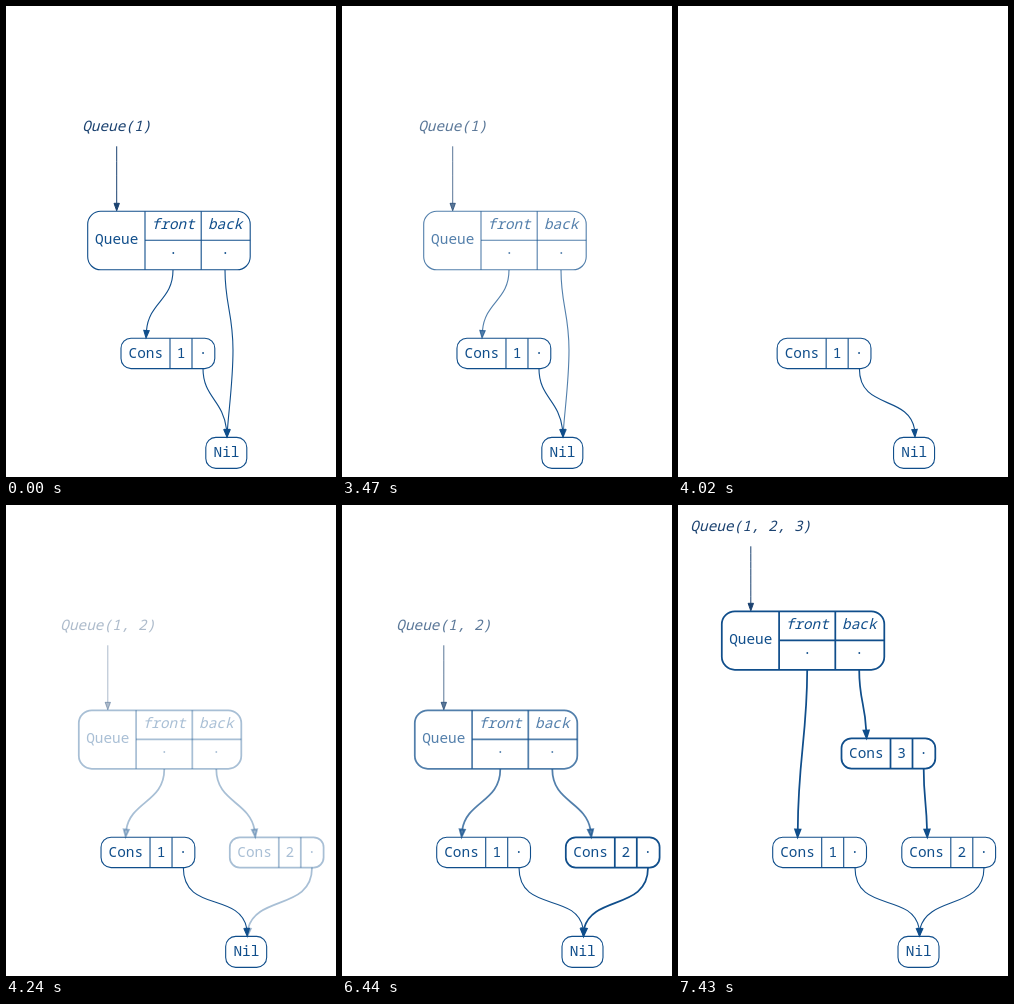
An HTML page with a canvas that plays this animation: 330 px wide and 471 px high, repeating every 8000 ms.

```html
<!DOCTYPE html>
<html lang="en">
<head>
<meta charset="utf-8">
<title>Persistent queue</title>
<style>
  html, body { margin: 0; height: 100%; overflow: hidden; background: #fff; }
  canvas { display: block; width: 330px; height: 471px; }
</style>
</head>
<body>
<canvas></canvas>
<script>
const W = 330, H = 471, LOOP = 8000, STEP = 110, FIRST = 500, DURATION = 1000;
const STARTS = [3400, 6370];
const BLUE = '#104e8b', DARK = '#1b4270';
const THIN = 1.1, THICK = 1.75;

const canvas = document.querySelector('canvas');
const ctx = canvas.getContext('2d');
const ratio = window.devicePixelRatio || 1;
canvas.width = W * ratio;
canvas.height = H * ratio;
ctx.scale(ratio, ratio);
ctx.textAlign = 'center';

function setColor(color) {
  ctx.strokeStyle = ctx.fillStyle = color;
}

function text(str, x, y, style = 'normal') {
  ctx.font = `${style} 14.4px "Noto Sans Mono", monospace`;
  ctx.fillText(str, x, y);
}

function box(x, y, w, h, r) {
  ctx.beginPath();
  ctx.roundRect(x, y, w, h, r);
  ctx.stroke();
}

function line(x1, y1, x2, y2) {
  ctx.beginPath();
  ctx.moveTo(x1, y1);
  ctx.lineTo(x2, y2);
  ctx.stroke();
}

function arrowHead(x, y, tipX, tipY) {
  const angle = Math.atan2(tipY - y, tipX - x);
  ctx.save();
  ctx.translate(tipX, tipY);
  ctx.rotate(angle);
  ctx.beginPath();
  ctx.moveTo(-0.5, 0);
  ctx.lineTo(-8, -2.7);
  ctx.lineTo(-8, 2.7);
  ctx.closePath();
  ctx.fill();
  ctx.stroke();
  ctx.restore();
}

// Points: start, then cubic segments, then the arrow tip.
function link(_, width, ...p) {
  ctx.lineWidth = width;
  ctx.beginPath();
  ctx.moveTo(p[0], p[1]);
  let i = 2;
  for (; i + 6 < p.length; i += 6) ctx.bezierCurveTo(...p.slice(i, i + 6));
  ctx.stroke();
  arrowHead(p[i - 2], p[i - 1], p[i], p[i + 1]);
}

function queue(label, width, x, y) {
  const mid = x + 29;
  setColor(DARK);
  text(label, mid, y - 80.5, 'italic');
  link(null, 1, mid, y - 65, mid, y - 45, mid, y - 25, mid, y - 8, mid, y);

  setColor(BLUE);
  ctx.lineWidth = width;
  box(x, y, 162.5, 58.5, 13);
  line(x + 57.3, y, x + 57.3, y + 58.5);
  line(x + 113.5, y, x + 113.5, y + 58.5);
  line(x + 57.3, y + 29, x + 162.5, y + 29);
  text('Queue', mid, y + 33);
  text('front', x + 85.5, y + 18, 'italic');
  text('back', x + 137.5, y + 18, 'italic');
  text('·', x + 85.5, y + 47);
  text('·', x + 137.5, y + 47);
}

function cons(value, width, x, y) {
  ctx.lineWidth = width;
  box(x, y, 93.8, 30.3, 10);
  line(x + 49, y, x + 49, y + 30.3);
  line(x + 71, y, x + 71, y + 30.3);
  text('Cons', x + 24.8, y + 19.7);
  text(value, x + 60, y + 19.7);
  text('·', x + 82, y + 19.7);
}

function nil(label, width, x, y) {
  ctx.lineWidth = width;
  box(x, y, 41, 31, 10);
  text(label, x + 20.7, y + 19.5);
}

const oneToNil = [link, '', THIN, 177, 362.5, 177, 408, 234, 387, 241, 423, 241.5, 431.5];
const twoToNil = width => [link, '', width, 306, 362.5, 306, 405, 251, 390, 242.2, 423, 241.5, 431.5];

// Items whose key occurs in two scenes move; the others fade.
const scenes = [
  {
    queue1: [queue, 'Queue(1)', THIN, 81.7, 205.3],
    front1: [link, '', THIN, 167, 264, 167, 294, 143, 296, 140.5, 324.5, 140, 332.5],
    back1: [link, '', THIN, 219, 264, 219, 299, 227, 307, 227, 344, 227, 374, 223, 402, 221.5, 423, 221, 431.5],
    cons1: [cons, '1', THIN, 115, 332.3],
    nil: [nil, 'Nil', THIN, 199.8, 431.4],
    oneToNil: [link, '', THIN, 197, 362.5, 197, 391, 217, 394, 220.5, 423, 221, 431.5]
  },
  {
    queue2: [queue, 'Queue(1, 2)', THICK, 72.8, 205.3],
    front2: [link, '', THICK, 158.3, 264, 158.3, 297, 125, 296, 120.3, 324.5, 119.6, 332.5],
    back2: [link, '', THICK, 210.3, 264, 210.3, 297, 243, 296, 248.5, 324.5, 249.3, 332.5],
    cons1: [cons, '1', THIN, 94.7, 332.3],
    cons2: [cons, '2', THICK, 223.8, 332.3],
    nil: [nil, 'Nil', THIN, 220, 431.4],
    oneToNil,
    twoToNil: twoToNil(THICK)
  },
  {
    queue3: [queue, 'Queue(1, 2, 3)', THICK, 43.8, 106.3],
    front3: [link, '', THICK, 129.2, 165, 129.2, 230, 120, 255, 119.8, 324.5, 119.6, 332.5],
    back3: [link, '', THICK, 181.2, 165, 181.2, 195, 187, 198, 188.2, 225.5, 188.6, 233.5],
    cons3: [cons, '3', THICK, 163.5, 233.3],
    threeToTwo: [link, '', THICK, 245.7, 264, 245.7, 293, 248.4, 296, 249, 324.5, 249.3, 332.5],
    cons1: [cons, '1', THIN, 94.7, 332.3],
    cons2: [cons, '2', THIN, 223.8, 332.3],
    nil: [nil, 'Nil', THIN, 220, 431.4],
    oneToNil,
    twoToNil: twoToNil(THIN)
  }
];

const clamp = v => Math.min(1, Math.max(0, v));
const ease = t => t < 0.5 ? 4 * t ** 3 : 1 - 4 * (1 - t) ** 3;

function drawItem([shape, label, ...nums], alpha) {
  if (alpha <= 0) return;
  ctx.globalAlpha = alpha;
  setColor(BLUE);
  shape(label, ...nums);
}

function render(time) {
  const now = FIRST + Math.floor((time - FIRST) / STEP) * STEP;
  const i = now < STARTS[1] ? 0 : 1;
  const p = clamp((now - STARTS[i]) / DURATION);
  const from = scenes[i], to = scenes[i + 1], k = ease(p);
  ctx.clearRect(0, 0, W, H);
  for (const key in from) {
    const a = from[key], b = to[key];
    if (b) drawItem(a.map((v, n) => n < 2 ? v : v + (b[n] - v) * k), 1);
    else drawItem(a, clamp(1 - 4 * p));
  }
  for (const key in to) {
    if (!from[key]) drawItem(to[key], clamp(4 * p - 3));
  }
}

const start = performance.now();
function tick() {
  render((performance.now() - start) % LOOP);
  requestAnimationFrame(tick);
}
tick();
</script>
</body>
</html>
```
